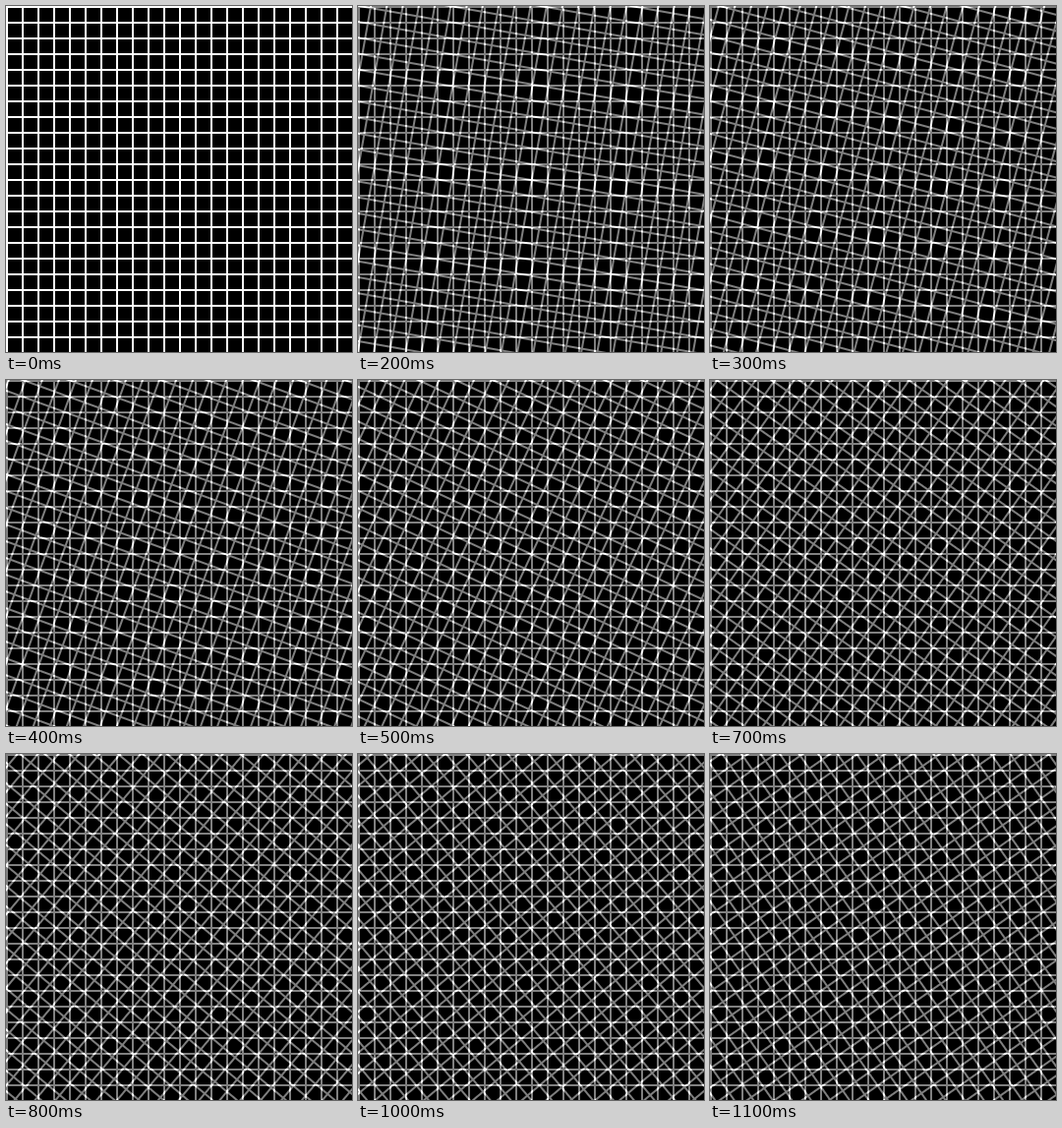
Recreate the animation shown at these times as an HTML page without scripts. Size 352 by 352 pixels, loop 1200 ms.

```html
<!DOCTYPE html>
<html lang="en">
<head>
<meta charset="utf-8">
<title>Rotating grid moiré</title>
<style>
  html, body { margin: 0; width: 100%; height: 100%; overflow: hidden; background: #000; }
  svg { display: block; width: 100vw; height: 100vh; }
  /* each wide dashed stroke draws a whole set of parallel 2px bars */
  .bars { fill: none; stroke: #fff; stroke-width: 576; stroke-dasharray: 2 14; }
  .top { opacity: .5; }
  .spin { transform-origin: 176px 176px; animation: spin 1.2s steps(12) infinite; }
  @keyframes spin { to { transform: rotate(60deg); } }
</style>
</head>
<body>
<svg viewBox="0 0 352 352">
  <defs>
    <g id="grid">
      <rect x="-112" y="-112" width="576" height="576"/>
      <path class="bars" d="M-112 176H464"/>
      <path class="bars" d="M176 -112V464"/>
    </g>
  </defs>
  <use href="#grid"/>
  <g class="top"><g class="spin"><use href="#grid"/></g></g>
</svg>
</body>
</html>
```
